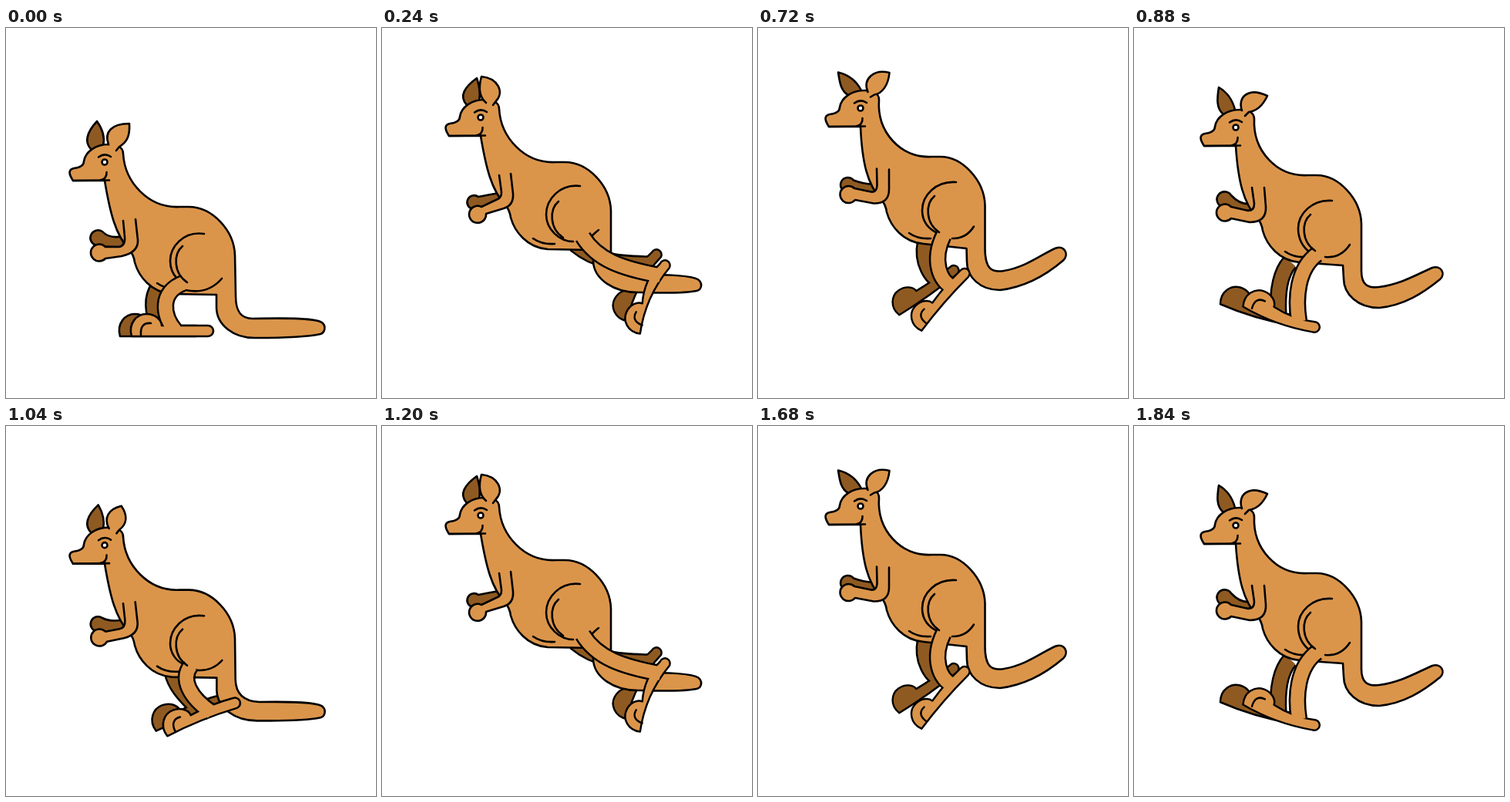
Animation, 480 px wide and 480 px high, one loop 1.92 s. Source, as an HTML page:

```html
<!DOCTYPE html>
<html lang="en">
<head>
<meta charset="utf-8">
<title>Hopping kangaroo</title>
<style>
  html, body { margin: 0; width: 100%; height: 100%; overflow: hidden; background: #fff; }
  svg { display: block; width: 100vw; height: 100vh; }
  path { fill: none; stroke: #000; stroke-width: 2.6; stroke-linecap: round; stroke-linejoin: round; }
  .tan { fill: #db954b; }
  .dark { fill: #8f5a21; }
  .edge, .core { fill: none; stroke-linecap: butt; }
  .edge { stroke-width: 22.5; stroke-dasharray: 999; stroke-dashoffset: -1; }
  .core { stroke-width: 17.5; stroke: #db954b; }
  .core.far { stroke: #8f5a21; }
</style>
</head>
<body>
<svg viewBox="0 0 480 480">
  <g id="roo">
    <g id="farLeg">
      <path class="edge"/>
      <g><path class="dark"/></g>
      <path class="core far"/>
    </g>
    <path id="farArm" class="dark"/>
    <path id="farEar" class="dark"/>
    <path id="body" class="tan"/>
    <g id="face">
      <path d="M87 198 L134 197.500 M130.500 187 C131 192 128 197 122 197.500 M120 167.500 Q128 161.500 136 167"/>
      <circle cx="128" cy="174" r="3.500" fill="#fff" stroke="#000" stroke-width="2.600"/>
    </g>
    <path id="ear" class="tan"/>
    <path id="crease" d="M196 331 Q207 339 224 338"/>
    <path id="thigh"/>
    <path id="rump"/>
    <path id="arm" class="tan"/>
    <g id="leg">
      <path class="edge"/>
      <g>
        <path class="tan"/>
        <path d="M-87 5 C-88 -7 -82 -11 -74 -10"/>
      </g>
      <path class="core"/>
    </g>
    <path id="curl" d="M229 283 C217 293 217 318 235 330"/>
  </g>
</svg>
<script>
const STEP = 80, HOP = 960;
const TIMES = [0, 240, 560, 880, 960];
const NUM = /-?\d+(\.\d+)?/g;

// Four key poses each: crouch, push-off, flight, reach
const torso = ["0 0 0 0", "-58 0 0 0", "-71 6 -6 -3", "-41 4 -4 -2"]; // body y, head x, head y, rump x

const tail = [
  "L298 348 C298 368 305 377 320 377 C365 376 405 376 411 383 C415 387 414 395 408 397 C385 402 350 402 325 402 C295 403 273 385 273 362 L273 346",
  "L297 292 C299 312 320 318 345 320 C380 320 408 322 412 328 C416 333 414 340 408 341 C395 344 370 344 335 343 C300 344 275 325 274 303 L274 288",
  "L294 275 C294 310 303 315 320 312 C350 306 372 283 386 278 C397 274 403 287 395 295 C375 313 345 330 310 335 C285 335 270 318 270 300 L270 282",
  "L295 315 C295 333 303 338 318 336 C348 332 370 318 387 311 C398 307 405 319 397 326 C375 344 350 360 318 363 C290 363 272 345 272 325 L271 308"
];

const shapes = {
  farEar: [
    "M110 157 C101 147 106 134 118 121 C126 132 128 144 126 153",
    "M110 100 C99 88 108 76 123 65 C127 77 128 85 126 95",
    "M119 81 C108 77 104 68 98 56 C115 56 126 60 136 72",
    "M116 112 C106 104 108 90 110 77 C122 84 128 94 131 106"
  ],
  ear: [
    "M133 151 C127 135 137 124 160 124 C161 140 157 148 147 154 L143 159",
    "M135 97 C124 88 126 74 129 63 C150 65 160 83 147 96 L144 100",
    "M145 77 C137 60 152 48 168 46 C172 64 166 80 153 82 L148 83",
    "M140 107 C134 90 148 76 173 88 C166 103 156 108 149 109 L144 114"
  ],
  arm: [
    "M152 250 L154 271 Q155 283 146 284 L129 284 A11 11 0 1 0 129 299 L150 296 Q172 291 171 275 L168 248",
    "M152 191 L155 213 Q155 220 150 222 L129 232 A11 11 0 1 0 135 241 L158 234 Q171 230 170 215 L167 189",
    "M155 176 L153 199 Q152 208 145 206 L124 202 A11 11 0 1 0 126 217 L150 221 Q168 222 169 205 L171 178",
    "M153 207 L156 228 Q156 237 148 237 L126 232 A11 11 0 1 0 126 247 L150 252 Q172 252 171 232 L169 207"
  ],
  farArm: [
    "M152 270 Q134 274 125 264 A10 10 0 1 0 117 282 Q125 284 155 284",
    "M152 214 Q140 216 125 219 A9 9 0 1 0 118 235 Q130 236 155 230",
    "M151 195 Q138 194 122 196 A9 9 0 1 0 118 212 Q130 212 153 209",
    "M152 228 Q138 230 126 217 A10 10 0 1 0 115 232 Q128 240 154 236"
  ],
  thigh: [
    "M257 267 C229 263 213 285 213 302 C213 312 217 320 222 325",
    "M257 205 C231 202 213 222 213 242 C213 261 230 277 248 277",
    "M257 194 C231 192 213 211 213 231 C213 246 222 256 242 261",
    "M257 224 C231 222 213 241 213 260 C213 274 219 284 228 291"
  ],
  rump: [
    "M280 325 Q262 346 233 340",
    "M281 262 Q277 265 272 270",
    "M280 252 Q272 266 256 267",
    "M280 281 Q268 299 248 297"
  ]
};

// shin: start and two controls; foot: heel x, y, turn, scale, bend, ankle offset
const legs = {
  leg: {
    shin: ["M230 331 C200 342 202 372", "M260 270 C278 300 310 312", "M244 262 C238 308 262 326", "M238 293 C212 312 209 350"],
    foot: ["262 393 0 1 0 -42", "367 308 -66 0.95 -14 -15", "302 267 -118 0.9 -16 -28", "234 388 20 0.97 9 -22"]
  },
  farLeg: {
    shin: ["M198 336 C188 350 189 368", "M250 280 C280 305 310 306", "M231 272 C236 305 265 318", "M203 303 C187 320 186 350"],
    foot: ["247 393 0 1 0 -47", "356 294 -62 0.95 -14 -15", "302 268 -87 0.87 0 -28", "206 379 16.5 0.97 6 -20"]
  }
};

const $ = id => document.getElementById(id);
const nums = s => s.split(" ").map(Number);
const move = (id, x, y) => $(id).setAttribute("transform", `translate(${x} ${y})`);

// Offsets every coordinate pair in a path
function shift(s, dx, dy) {
  let i = 0;
  return s.replace(NUM, n => +n + (i++ % 2 ? dy : dx));
}

// Mixes the numbers of two neighbouring poses; whole numbers stay whole for arc flags
function blend(keys, seg, u) {
  const to = keys[(seg + 1) % 4].match(NUM);
  let i = 0;
  return keys[seg].replace(NUM, n => +(+n + (to[i++] - n) * u).toFixed(3));
}

function bodyPath(dy, hx, hy, rx, tailPath) {
  const head = s => shift(s, hx, dy + hy), trunk = s => shift(s, 0, dy);
  return head("M87 198 C83 192 79 184 88 182 C96 181 101 179 101 173 C103 160 117 151 133 151 C146 151 152 156 152 163")
    + trunk("C154 200 185 234 225 232 L237 232")
    + shift("C267 232 296 262 297 295", rx, dy)
    + tailPath
    + trunk("L215 345 C188 343 172 322 167 304 C166 297 164 292 160 288 C142 268 135 240")
    + " " + head("128 198") + "Z";
}

function drawLeg(id, seg, u, raise) {
  const { shin, foot } = legs[id];
  const [x, heelY, turn, scale, bend, ankle] = nums(blend(foot, seg, u));
  const y = heelY + raise, a = turn * Math.PI / 180, k = ankle * scale;
  const [edge, core] = $(id).querySelectorAll(".edge, .core");
  const d = `${blend(shin, seg, u)} ${x + k * Math.cos(a)} ${y + k * Math.sin(a)}`;
  edge.setAttribute("d", d);
  core.setAttribute("d", d);
  const g = $(id).querySelector("g");
  g.setAttribute("transform", `translate(${x} ${y}) rotate(${turn}) scale(${scale})`);
  g.firstElementChild.setAttribute("d",
    `M0 7 Q-50 ${7 + bend} -99 7 C-104 -10 -92 -22 -80 -22 C-68 -22 -60 -14 -60 -7 Q-30 ${bend * 0.8 - 7} 0 -7 A7 7 0 0 1 0 7Z`);
}

function draw(ms) {
  const phase = Math.floor(ms % HOP / STEP) * STEP;
  const seg = TIMES.findIndex((_, i) => phase < TIMES[i + 1]);
  const u = (phase - TIMES[seg]) / (TIMES[seg + 1] - TIMES[seg]);
  const arc = Math.sin(Math.PI * u);

  const [dy, hx, hy, rx] = nums(blend(torso, seg, u));
  $("body").setAttribute("d", bodyPath(dy, hx, hy, rx, blend(tail, seg, u)));
  for (const id in shapes) $(id).setAttribute("d", blend(shapes[id], seg, u));
  for (const id in legs) drawLeg(id, seg, u, seg === 0 ? -6 * arc : 0);
  move("face", hx, dy + hy);
  move("crease", 0, dy);
  move("curl", 0, dy);
  move("roo", 0, seg === 1 || seg === 2 ? -9 * arc : 0);
}

const start = performance.now();
function tick() {
  draw(performance.now() - start);
  requestAnimationFrame(tick);
}
tick();
</script>
</body>
</html>
```
